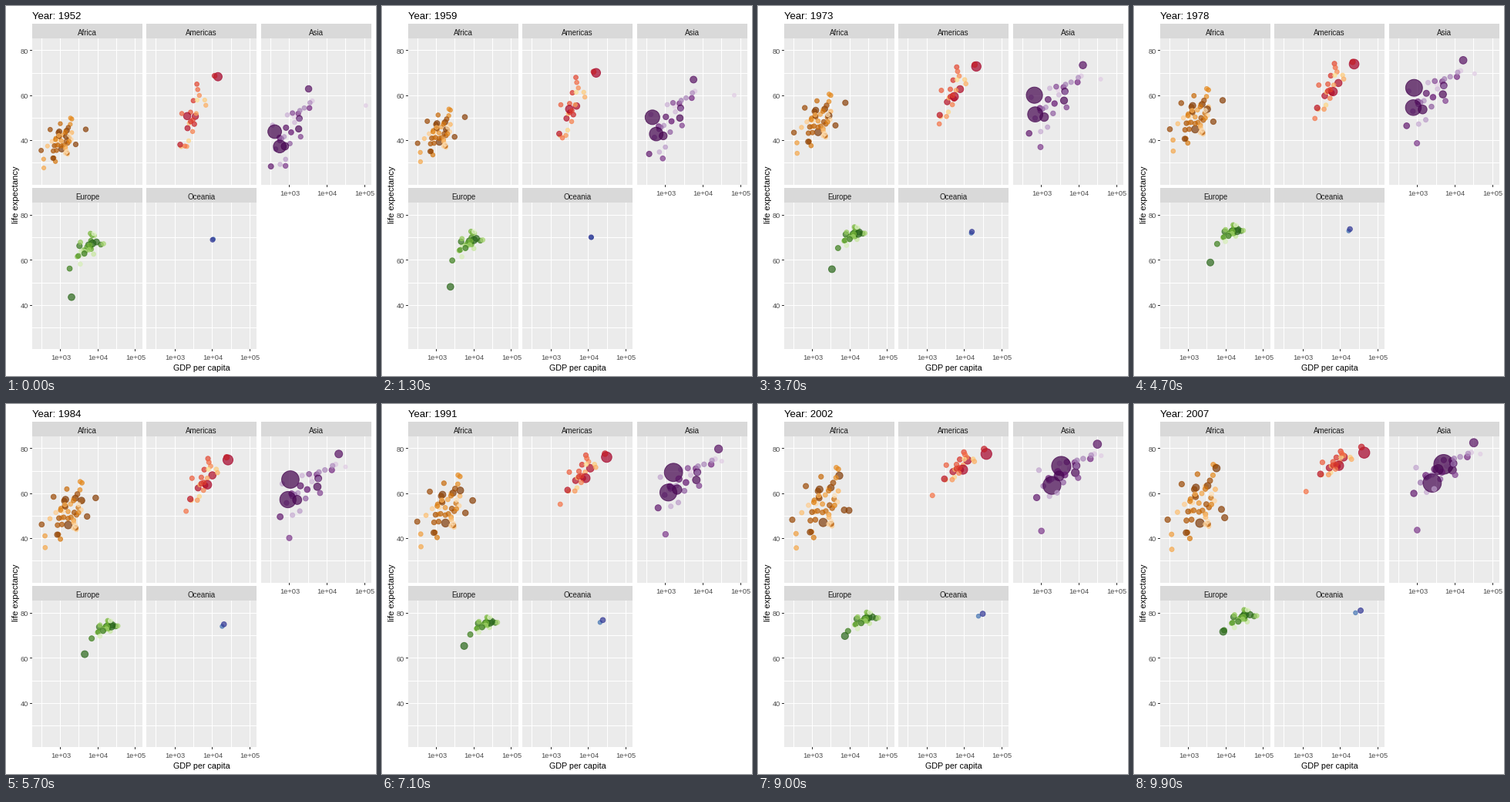
Animation of 480x480 px, one loop 10000 ms. Source, as a matplotlib script:

```python
import numpy as np
import matplotlib.pyplot as plt
from matplotlib.animation import FuncAnimation
from matplotlib.colors import to_rgb
from matplotlib.patches import Rectangle

plt.rcParams["font.family"] = "Liberation Sans"

SIZE, DPI = 480, 72
FRAMES, INTERVAL = 100, 100
STEP = 9                       # frames per five-year knot
W, H, STRIP = 143, 189, 19
LIFE_TOP, LIFE_PX = 85.55, 2.92
GDP_LEFT, GDP_PX = 2.249, 48.6
MAX_POP = 1319

rng = np.random.default_rng(12)

# keys: population rank -> (millions, then gdp and life in 1952, 1982, 2007).
# The other countries are scattered around a trend of log gdp and life, each
# with a mean and a spread for the same three years.
PANELS = [
    dict(name="Africa", at=(0, 0), n=52, growth=0.28, pop=(180, 0.85), link=0.5,
         ramp="#7F3B08 #B35806 #E08214 #FDB863 #FEE0B6",
         gdp=[(2.97, 0.27), (3.13, 0.35), (3.2, 0.42)],
         life=[(39.5, 5), (51, 6.5), (55, 8.5)],
         keys={0: (135, 1077, 36.3, 1577, 45.8, 2014, 46.9),
               1: (80, 1419, 41.9, 3503, 56.0, 5581, 71.3),
               4: (44, 4725, 45.0, 8568, 58.2, 9270, 49.3)}),
    dict(name="Americas", at=(1, 0), n=25, growth=0.42, pop=(250, 1.2), link=0.6,
         ramp="#A50026 #D73027 #F46D43 #FDAE61 #FEE090",
         gdp=[(3.48, 0.19), (3.76, 0.2), (3.88, 0.23)],
         life=[(51, 8), (65.5, 5.5), (73.5, 3)],
         keys={0: (301, 13990, 68.4, 25010, 74.7, 42952, 78.2),
               1: (190, 2109, 50.9, 7031, 63.3, 9066, 72.4),
               2: (109, 3478, 50.8, 9611, 67.4, 11978, 76.2),
               5: (33, 11367, 68.8, 22899, 75.8, 36319, 80.7),
               14: (9, 1840, 37.6, 2011, 51.5, 1202, 60.9)}),
    dict(name="Asia", at=(2, 0), n=33, growth=0.4, pop=(600, 1.2), link=0.7,
         ramp="#40004B #762A83 #9970AB #C2A5CF #E7D4E8",
         gdp=[(3.15, 0.36), (3.6, 0.48), (3.8, 0.5)],
         life=[(46, 8), (63, 6.5), (71, 5)],
         keys={0: (1319, 400, 44.0, 962, 65.5, 4959, 73.0),
               1: (1110, 547, 37.4, 856, 56.6, 2452, 64.7),
               2: (224, 750, 37.5, 1517, 56.2, 3541, 70.7),
               5: (127, 3217, 63.0, 19384, 77.1, 31656, 82.6),
               12: (32, 779, 28.8, 978, 39.9, 975, 43.8),
               31: (2, 108382, 55.6, 31354, 71.3, 47307, 77.6)}),
    dict(name="Europe", at=(0, 1), n=30, growth=0.78, pop=(130, 0.9), link=0.75,
         ramp="#276419 #4D9221 #7FBC41 #B8E186 #E6F5D0",
         gdp=[(3.68, 0.26), (4.15, 0.2), (4.37, 0.25)],
         life=[(65.3, 4.3), (73, 2.2), (77.7, 2.5)],
         keys={0: (82, 7144, 67.5, 22032, 73.8, 32170, 79.4),
               1: (71, 1969, 43.6, 4241, 61.0, 8458, 71.8)}),
    dict(name="Oceania", at=(1, 1), n=2, growth=0.45,
         ramp="#313695 #4575B4",
         keys={0: (20, 10040, 69.1, 19477, 74.7, 34435, 81.2),
               1: (4, 10557, 69.4, 17632, 73.8, 25185, 80.2)}),
]


def corner(col, row):
    return 34.2 + 148.6 * col, 41.65 + 213.6 * row


def to_x(left, log_gdp):
    return left + (log_gdp - GDP_LEFT) * GDP_PX


def to_y(top, life):
    return top + (LIFE_TOP - life) * LIFE_PX


def curve(three):
    """Quadratic through 1952, 1982 and 2007, sampled every five years."""
    return np.polyval(np.polyfit([0, 6, 11], three, 2), np.arange(12))


def scattered(p):
    """Random country that keeps its standing around the trend."""
    a, b = np.clip(rng.normal(size=2), -1.8, 1.8)
    b = p["link"] * a + np.sqrt(1 - p["link"] ** 2) * b
    return [m + s * a for m, s in p["gdp"]], [m + s * b for m, s in p["life"]]


def country(p, rank):
    if rank in p["keys"]:
        pop, *row = p["keys"][rank]
        gdp, life = np.log10(row[::2]), row[1::2]
    else:
        scale, power = p["pop"]
        pop = scale / (rank + 1) ** power
        gdp, life = scattered(p)
    left, top = corner(*p["at"])
    share = pop * np.linspace(p["growth"], 1, 12) / MAX_POP
    radius = 1.067 * (2 + 10 * np.sqrt(share))
    return to_x(left, curve(gdp)), to_y(top, curve(life)), radius


def ramp_color(p, rank):
    stops = np.array([to_rgb(c) for c in p["ramp"].split()])
    u = (rank / (p["n"] - 1)) ** 1.2
    s = np.linspace(0, 1, len(stops))
    return [np.interp(u, s, channel) for channel in stops.T]


pairs = [(p, rank) for p in PANELS for rank in range(p["n"])]
paths = np.array([country(*pair) for pair in pairs])
colors = np.array([ramp_color(*pair) for pair in pairs])
order = rng.permutation(len(pairs))
paths, colors = paths[order], colors[order]

fig = plt.figure(figsize=(SIZE / DPI, SIZE / DPI), dpi=DPI, facecolor="white")
ax = fig.add_axes([0, 0, 1, 1])
ax.set_xlim(0, SIZE)
ax.set_ylim(SIZE, 0)
ax.axis("off")


def hline(x0, x1, y, color):
    y = np.floor(y) + 0.5
    ax.plot([x0, x1], [y, y], color=color, lw=1, solid_capstyle="butt", snap=False)


def vline(x, y0, y1, color):
    x = np.floor(x) + 0.5
    ax.plot([x, x], [y0, y1], color=color, lw=1, solid_capstyle="butt", snap=False)


def label(x, y, s, size, color="black", **kw):
    return ax.text(x, y, s, fontsize=size, color=color, **{"va": "baseline", **kw})


def draw_panel(p):
    col, row = p["at"]
    left, top = corner(col, row)
    x0, y0 = int(left), round(top)
    x1, y1 = x0 + W, y0 + H + 1
    ax.add_patch(Rectangle((x0, y0), W, y1 - y0, fc="#EBEBEB", lw=0))
    ax.add_patch(Rectangle((x0, y0 - STRIP), W, STRIP, fc="#D9D9D9", lw=0))
    label(x0 + W / 2, y0 - 4.1, p["name"], 9.7, "#1A1A1A", ha="center")
    for life in range(30, 81, 10):
        y = to_y(top, life)
        hline(x0, x1, y, "white")
        if col == 0 and life % 20 == 0:
            hline(x0 - 3, x0, y, "#333333")
            label(x0 - 4.7, y + 3.8, str(life), 9.2, "#4D4D4D", ha="right")
    for half in range(5, 11):
        x = to_x(left, half / 2)
        vline(x, y0, y1, "white")
        if half % 2 == 0 and (row == 1 or col == 2):
            vline(x, y1, y1 + 3, "#333333")
            label(x + 0.3, y1 + 13.6, f"1e+0{half // 2}", 9.2, "#4D4D4D", ha="center")


for p in PANELS:
    draw_panel(p)
label(254.2, 473, "GDP per capita", 10.8, ha="center")
label(12.8, 245, "life expectancy", 11.2, ha="center", va="center", rotation=90)
title = label(33.9, 17, "", 13.2)
dots = ax.scatter(paths[:, 0, 0], paths[:, 1, 0], c=colors, alpha=0.7,
                  linewidths=1, zorder=3)


def update(i):
    t = i / STEP
    k = min(int(t), 10)
    x, y, r = (paths[:, :, k] + (paths[:, :, k + 1] - paths[:, :, k]) * (t - k)).T
    title.set_text(f"Year: {round(1952 + 5 * t)}")
    dots.set_offsets(np.column_stack([x, y]))
    dots.set_sizes((2 * r) ** 2)
    return title, dots


anim = FuncAnimation(fig, update, frames=FRAMES, interval=INTERVAL,
                     repeat=True, repeat_delay=0)
plt.show()
```
